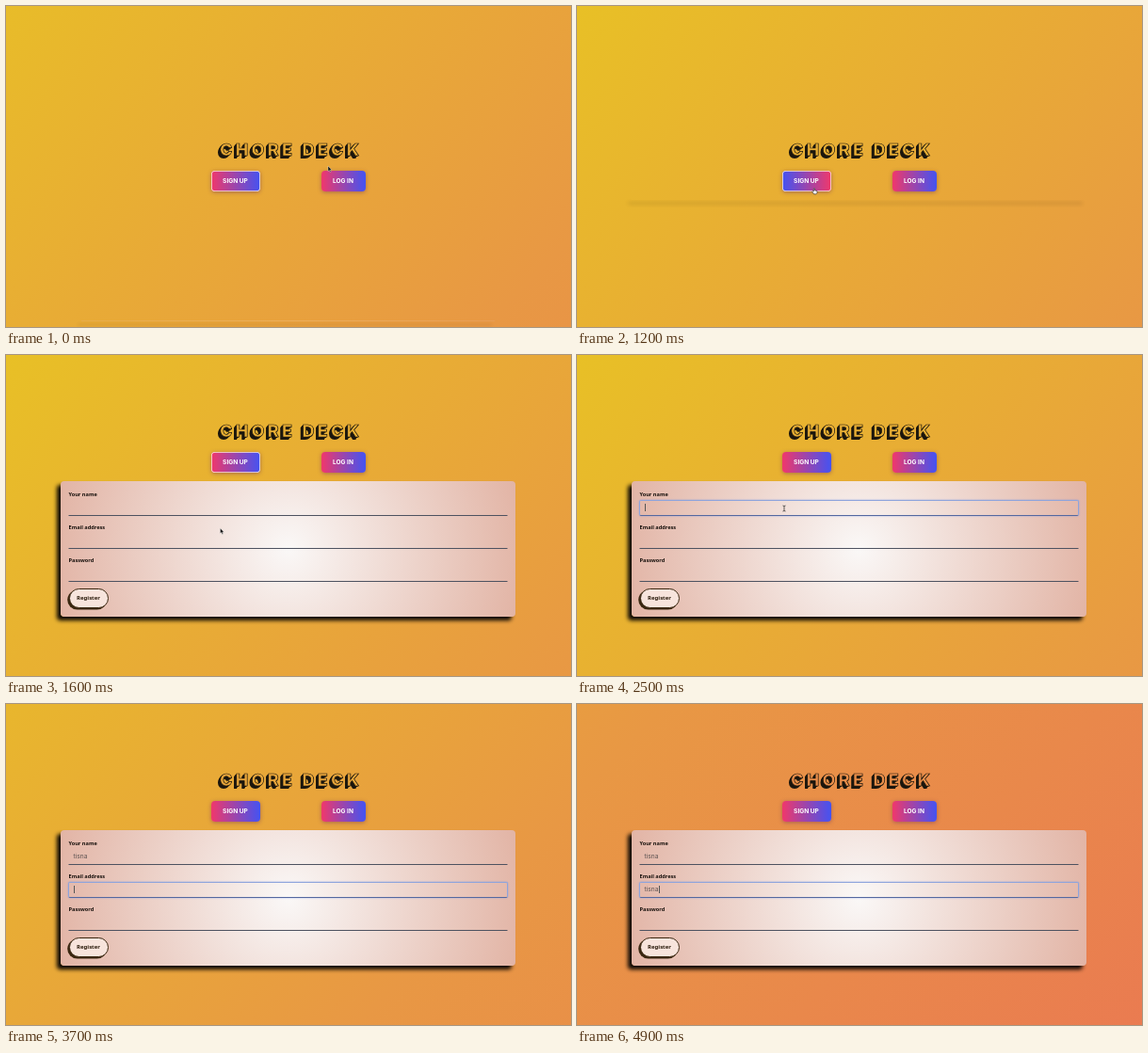
These frames come from a looping animation (600 px wide and 341 px high, 5 s). An HTML page:

```html
<!DOCTYPE html>
<html lang="en">
<head>
<meta charset="utf-8">
<title>Chore Deck</title>
<style>
html, body { margin: 0; width: 100%; height: 100%; overflow: hidden; }
#stage { position: relative; width: 600px; height: 341px; overflow: hidden; }
#stage div, #stage svg { position: absolute; box-sizing: border-box; white-space: nowrap; }
#page { left: 0; top: 0; width: 600px; height: 341px; }
#title {
  left: 227px; top: 68.6px; font: 800 18px/24px Inter, sans-serif; letter-spacing: 3.3px;
  -webkit-text-stroke: .7px #1c170e;
  text-shadow: -.7px .7px #1c170e, -1.4px 1.4px #1c170e, -2.1px 2.1px #1c170e, -2.7px 2.7px #1c170e;
}
.btn {
  top: 103px; height: 22px; border-radius: 4px; color: #fff; text-align: center;
  font: 700 6.6px/22px Inter, sans-serif; box-shadow: 0 1px 4px #6a306080;
  background: linear-gradient(90deg, #f0386b, #4353f2 50%, #f0386b) 0 0 / 200% 100%;
}
#card {
  left: 58px; width: 483px; border-radius: 4px; box-shadow: -4px 4px 4px #0c0805;
  background: radial-gradient(circle at 50% 72px, #faf8f7, #e2b4a5 252px);
}
#form { inset: 0; overflow: hidden; border-radius: 4px; }
.label { left: 8.5px; font: 700 5.6px/8px "Noto Sans", sans-serif; color: #17100c; }
.field {
  left: 8px; width: 467px; height: 17px; border: 1px solid transparent; border-bottom-color: #4d5260;
  padding-left: 4.5px; font: 400 6.6px/15px Inter, sans-serif; color: #5a5150;
}
.field.on { border-color: #8ea4dc; border-bottom-color: #5468a0; border-radius: 2px; box-shadow: 0 0 1.5px #6f90e6; }
.field i { display: inline-block; width: .7px; height: 8px; margin-left: .3px; vertical-align: -1.8px; background: #555; }
#register {
  left: 8.5px; top: 114px; width: 42px; height: 21px; border-radius: 11px; border: 1px solid #3a2710;
  background: #f7e4dc; box-shadow: -1.8px 1.6px #3a2710; text-align: center;
  font: 700 6px/19px "Noto Sans", sans-serif; color: #2b1c0c;
}
#cursors { left: 0; top: 0; }
</style>
</head>
<body>
<div id="stage">
  <div id="page">
    <div id="title">CHORE DECK</div>
    <div class="btn" id="signup" style="left:217.5px;width:52px">SIGN UP</div>
    <div class="btn" style="left:334.5px;width:47px">LOG IN</div>
    <div id="card"><div id="form">
      <div class="label" style="top:9.5px">Your name</div>
      <div class="field" style="top:20px"></div>
      <div class="label" style="top:44.5px">Email address</div>
      <div class="field" style="top:55px"></div>
      <div class="label" style="top:79.5px">Password</div>
      <div class="field" style="top:90px"></div>
      <div id="register">Register</div>
    </div></div>
  </div>
  <svg id="cursors" width="600" height="341">
    <g id="cursor">
      <path d="M0 0V5.6L1.3 4.5 2.2 6.5 3.1 6.1 2.2 4.2H4Z" fill="#111" stroke="#fff" stroke-width=".35"/>
      <path d="M-.6-2.2Q0-2.9 .6-2.2V0L3 .5V2.2Q2.6 3.8 1.6 3.8H-.4L-2.3 1-1.6 .4-.6 1Z" fill="#fff" stroke="#222" stroke-width=".6"/>
      <path d="M-1.5-3Q0-3 0-2Q0-3 1.5-3M0-2V2M-1.5 3Q0 3 0 2Q0 3 1.5 3" fill="none" stroke="#222" stroke-width=".7"/>
    </g>
  </svg>
</div>
<script>
const $ = id => document.getElementById(id);
const NAME = 'tisna';
const fields = document.querySelectorAll('.field');
const pointers = $('cursor').children;
const route = [[0, 342, 170], [1, 252, 196], [1.25, 252, 196], [1.6, 227.5, 184], [2.2, 220, 163], [5, 220, 163]];

const ramp = (t, a, b) => Math.min(1, Math.max(0, (t - a) / (b - a)));
const ease = (t, a, b) => { const k = ramp(t, a, b); return k * k * (3 - 2 * k); };
const typed = (t, start, step) => NAME.slice(0, Math.max(0, Math.floor((t - start) / step) + 1));

function setField(el, text, focused) {
  el.textContent = text;
  el.classList.toggle('on', focused);
  if (focused) el.append(document.createElement('i'));
}

function drawCursor(t) {
  const n = route.findIndex(p => p[0] > t), [a, x, y] = route[n - 1], [b, x2, y2] = route[n];
  const k = ease(t, a, b);
  $('cursor').setAttribute('transform', `translate(${x + (x2 - x) * k} ${y + (y2 - y) * k})`);
  const kind = t > 2.7 ? -1 : t > 1.9 ? 2 : t > .85 && t < 1.35 ? 1 : 0;
  [...pointers].forEach((p, i) => p.style.display = i === kind ? '' : 'none');
}

function draw(t) {
  // background drifts along its diagonal
  const s = .1 * (1 - ramp(t, 0, 1.2)) ** 2 + .9 * ((Math.max(t, 2.4) - 2.4) / 2.5) ** 2;
  const at = u => (u - s) * 100 + '%';
  $('stage').style.background =
    `linear-gradient(135deg, #e8c026 ${at(0)}, #e89844 ${at(1)}, #ea7852 ${at(2)}, #ee5f55 ${at(2.4)})`;
  $('title').style.color = `rgb(232 ${174 - 37 * s} ${52 + 23 * s})`;

  // the flat card rises, then opens and pushes the heading up
  const open = ease(t, 1.2, 1.5), rise = 1 - ease(t, 0, 1.1);
  $('page').style.transform = `translateY(${72 * (1 - open)}px)`;
  const card = $('card').style;
  card.top = 132.6 + 1.4 * open + 'px';
  card.height = .6 + 142.9 * open + 'px';
  card.opacity = .32 - .14 * rise + .68 * open;
  card.transform = `translateY(${129 * rise}px) scaleX(${1 - .09 * rise})`;

  // only the hovered button swaps its colours
  const hover = ease(t, .7, 1) - ease(t, 1.25, 1.55);
  $('signup').style.backgroundPosition = hover * 100 + '% 0';
  $('signup').style.boxShadow = t < 2.2 ? 'inset 0 0 0 .8px #fbe9dc, 0 1px 4px #6a306080' : '';

  setField(fields[0], typed(t, 2.7, .15), t >= 2.2 && t < 3.6);
  setField(fields[1], typed(t, 3.9, .16), t >= 3.6);
  drawCursor(t);
}

function tick(now) {
  draw(now % 5000 / 1000);
  requestAnimationFrame(tick);
}
draw(0);
requestAnimationFrame(tick);
</script>
</body>
</html>
```
